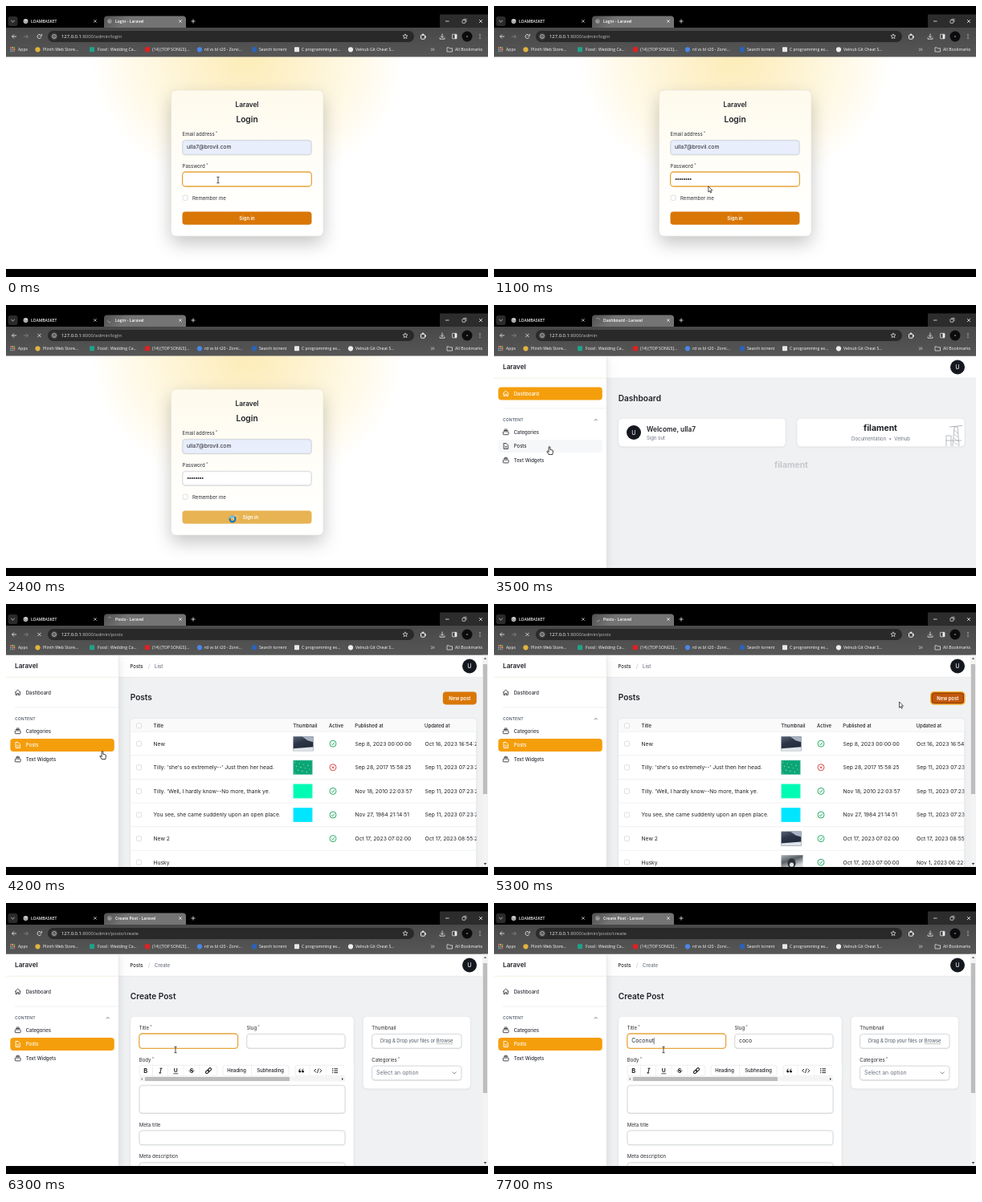
An HTML page with a canvas that plays this animation: 600x338 px, repeating every 8000 ms.

```html
<!DOCTYPE html>
<html lang="en">
<head>
<meta charset="utf-8">
<title>Admin panel walkthrough</title>
<style>
html, body { margin: 0; width: 100%; height: 100%; overflow: hidden; background: #000; }
canvas { display: block; width: 600px; height: 338px; }
</style>
</head>
<body>
<canvas id="stage"></canvas>
<script>
const W = 600, H = 338, LOOP = 8000, STEP = 100;
const UI = 'Inter, sans-serif', CHROME = '"Open Sans", sans-serif';
const AMBER = '#f59e0b', ORANGE = '#d97706', INK = '#1f2126', GREY = '#6b7280', LINE = '#dfe1e5';
const USER = 'ulla7';

const canvas = document.getElementById('stage');
const ratio = window.devicePixelRatio || 1;
canvas.width = W * ratio;
canvas.height = H * ratio;
const c = canvas.getContext('2d');

// ---- drawing helpers ----
function text(s, x, y, size, { w = 400, col = INK, font = UI, align = 'left' } = {}) {
  c.font = `${w} ${size}px ${font}`;
  c.fillStyle = col;
  c.textAlign = align;
  c.fillText(s, x, y + size * 0.36);
  return c.measureText(s).width;
}
function box(x, y, w, h, r, fill, stroke, lw = 0.7) {
  c.beginPath();
  c.roundRect(x, y, w, h, r);
  if (fill) { c.fillStyle = fill; c.fill(); }
  if (stroke) { c.strokeStyle = stroke; c.lineWidth = lw; c.stroke(); }
}
function disc(x, y, r, fill) {
  c.beginPath();
  c.arc(x, y, r, 0, 7);
  c.fillStyle = fill;
  c.fill();
}
function arc(x, y, r, a, b, col, lw = 0.8) {
  c.beginPath();
  c.arc(x, y, r, a, b);
  c.strokeStyle = col;
  c.lineWidth = lw;
  c.stroke();
}
function path(pts, col, lw = 0.8, fill) {
  c.beginPath();
  for (let i = 0; i < pts.length; i += 2) c.lineTo(pts[i], pts[i + 1]);
  if (fill) { c.closePath(); c.fillStyle = fill; c.fill(); }
  if (col) { c.strokeStyle = col; c.lineWidth = lw; c.stroke(); }
}
function cross(x, y, r, col, lw = 0.8) {
  path([x - r, y - r, x + r, y + r], col, lw);
  path([x + r, y - r, x - r, y + r], col, lw);
}
function shadowed(blur, dy, col, draw) {
  c.save();
  c.shadowBlur = blur * ratio;
  c.shadowOffsetY = dy * ratio;
  c.shadowColor = col;
  draw();
  c.restore();
}
function card(x, y, w, h) {
  shadowed(2, 0.8, '#0001', () => box(x, y, w, h, 5, '#fff'));
  box(x, y, w, h, 5, null, LINE, 0.6);
}
function label(s, x, y, required) {
  const w = text(s, x, y, 6.1, { col: '#2b2d33' });
  if (required) text('*', x + w + 1.2, y - 1.6, 5, { col: '#7a5a5a' });
}
function input(x, y, w, h, focus, fill = '#fff') {
  if (focus) box(x + 0.1, y, w - 0.2, h, 3.8, fill, '#e6a53c', 1.3);
  else shadowed(1, 0.5, '#0002', () => box(x + 0.3, y + 0.3, w - 0.6, h - 0.6, 3.5, fill, '#d5d8dd'));
}
function checkbox(x, y) {
  box(x + 0.3, y + 0.3, 6, 6, 1.3, '#fff', '#cfd2d7', 0.7);
}
function avatar(x, y) {
  disc(x, y, 9, '#15181f');
  text('U', x, y, 7.2, { col: '#fff', align: 'center' });
}

// ---- timing ----
const within = (t, a, b) => t >= a && t < b;
const last = (t, list) => list.filter(e => e[0] <= t).pop();
const busy = t => within(t, 2100, 2500) || within(t, 3400, 4600) || within(t, 5100, 5800);

const PAGES = [
  [0, 'Login', '/login', drawLogin],
  [2500, 'Dashboard', '', drawDashboard],
  [3900, 'Posts', '/posts', drawPosts],
  [5700, 'Create Post', '/posts/create', drawCreate]
];

const MOVES = [
  [0, 264, 217], [1000, 264, 217], [1400, 282, 267], [2700, 282, 267], [3300, 69, 176.5],
  [3700, 69, 176.5], [4100, 120, 183.5], [4500, 120, 183.5], [4900, 563, 117], [5100, 563, 117],
  [5300, 504.5, 122], [5600, 504.5, 122], [6100, 211, 183]
];
const SHAPES = [
  [0, 'beam'], [100, ''], [1000, 'arrow'], [1300, 'hand'], [1500, 'wait'], [2500, 'arrow'],
  [3200, 'hand'], [4500, 'arrow'], [4900, 'hand'], [5200, 'arrow'], [6100, 'beam']
];
const DOTS = [[0, 0], [100, 1], [400, 3], [500, 4], [700, 5], [800, 7], [900, 8]];
const TYPED = [
  [0, '', ''], [6500, 'C', ''], [7000, 'Co', ''], [7100, 'Co', 'c'], [7300, 'Coc', 'c'],
  [7400, 'Coc', 'co'], [7600, 'Coco', 'co'], [7700, 'Coconut', 'coco']
];

function pointer(t) {
  const i = MOVES.findLastIndex(m => m[0] <= t);
  const a = MOVES[i], b = MOVES[i + 1] || a;
  const k = a === b ? 0 : (t - a[0]) / (b[0] - a[0]);
  const e = k * k * (3 - 2 * k);
  return [a[1] + (b[1] - a[1]) * e, a[2] + (b[2] - a[2]) * e];
}

// ---- browser frame ----
function favicon(x, y, t, loading) {
  if (loading) arc(x, y, 2.6, t / 120, t / 120 + 2, '#aaa', 0.8);
  else {
    disc(x, y, 2.9, '#888');
    arc(x, y, 1.5, 0, 4, '#bbb', 0.6);
  }
}
function drawBrowser(t, title, route) {
  const white = '#f0f0f0', loading = busy(t);
  c.fillStyle = '#000';
  c.fillRect(0, 0, W, H);
  c.fillStyle = '#2c2c2c';
  c.fillRect(540, 10.5, 60, 17);
  box(2.5, 13, 12, 12, 3, '#2b2b2b');
  path([6.4, 18, 8.5, 20, 10.6, 18], white);

  disc(24.5, 19, 2.9, '#ccc');
  arc(24.5, 19, 1.5, 0, 4, '#555', 0.6);
  text('LOAMBASKET', 31, 19, 5, { w: 600, col: '#eee', font: CHROME });
  cross(111, 19, 1.7, '#ccc');
  const tab = c.createLinearGradient(122, 12, 140, 28);
  tab.addColorStop(0, '#505050');
  tab.addColorStop(1, '#747474');
  box(122, 12.5, 102, 18, 4, tab);
  favicon(129, 19, t, loading);
  text(title + ' - Laravel', 136, 19, 5.1, { w: 600, col: '#fff', font: CHROME });
  cross(217, 19, 1.7, white);
  path([230.5, 19, 235.5, 19], white);
  path([233, 16.5, 233, 21.5], white);
  path([547, 19, 551.5, 19], white);
  box(568, 17.5, 3.8, 3.8, 0.5, null, white);
  path([569.3, 16.3, 573, 16.3, 573, 20], white, 0.6);
  cross(591, 19, 2, white);

  const bar = c.createLinearGradient(0, 27, 0, 63);
  bar.addColorStop(0, '#484848');
  bar.addColorStop(1, '#565656');
  c.fillStyle = bar;
  c.fillRect(0, 27, W, 36.5);

  path([13, 38, 7.5, 38], white);
  path([10, 35.5, 7.5, 38, 10, 40.5], white);
  path([22, 38, 27.5, 38], '#8a8a8a');
  path([25, 35.5, 27.5, 38, 25, 40.5], '#8a8a8a');
  if (loading) cross(41.5, 38, 2.1, white);
  else {
    arc(41.5, 38, 2.5, 0.4, 5.4, white);
    path([44.4, 34.8, 44.4, 37.3, 41.9, 37.3], white);
  }
  box(52, 31, 456, 14, 7, '#292929');
  disc(60, 38, 4.6, '#3e3e3e');
  arc(60, 38, 2.4, 0, 7, white, 0.7);
  path([60, 37.6, 60, 39.3], white, 0.7);
  const host = text('127.0.0.1', 69, 38, 5.9, { w: 500, col: '#fff', font: CHROME });
  text(':8000/admin' + route, 69 + host, 38, 5.9, { col: '#bdbdbd', font: CHROME });

  const star = [];
  for (let i = 0; i < 11; i++) {
    const r = i % 2 ? 1.4 : 3.2, a = i * Math.PI / 5 - Math.PI / 2;
    star.push(497 + r * Math.cos(a), 38 + r * Math.sin(a));
  }
  path(star, white, 0.7);
  box(516.5, 36.2, 5, 5, 0.8, null, white, 1);
  disc(519, 35.7, 1.1, white);
  disc(522, 38.5, 1.1, white);
  path([543, 34.5, 543, 39.3], white);
  path([541, 37.5, 543, 39.5, 545, 37.5], white);
  path([540, 39.5, 540, 41.2, 546, 41.2, 546, 39.5], white);
  box(555.5, 35.3, 5.5, 5.5, 0.6, null, white);
  c.fillStyle = white;
  c.fillRect(558.6, 35.3, 2.4, 5.5);
  disc(574, 38, 6.5, '#0c0c0e');
  disc(574, 38, 1, '#777');
  for (const y of [35.7, 38, 40.3]) disc(590, y, 0.6, white);

  const mark = (s, x) => text(s, x, 54.5, 5.15, { w: 500, col: '#fafafa', font: CHROME });
  const hues = ['#e8675a', '#f0c04a', '#61b36b', '#6a9df0'];
  for (let i = 0; i < 9; i++) {
    c.fillStyle = hues[i % 4];
    c.fillRect(5 + i % 3 * 2.3, 51 + Math.floor(i / 3) * 2.3, 1.6, 1.6);
  }
  mark('Apps', 15);
  const square = (x, col) => box(x - 3, 51.3, 6, 6, 0.8, col);
  disc(39.5, 54.3, 3.1, '#e2b43c'); mark('Plinth Web Store...', 46);
  square(107, '#1fa38a'); mark('Food : Wedding Ca...', 114);
  square(176, '#e02020'); mark('(14) [TOP SONGS]...', 182);
  disc(241, 54.3, 3.1, '#4a86e8'); mark('rd vs bl t20 - Zorvi...', 247);
  square(309, '#2c62b4'); mark('Search torrent', 315);
  square(362, '#e8e8e8'); mark('C programming ex...', 368);
  disc(429, 54.3, 3.1, '#eee'); mark('Velnub Git Cheat S...', 435);
  path([529, 52.5, 530.8, 54.3, 529, 56.1], white, 0.7);
  path([531.3, 52.5, 533.1, 54.3, 531.3, 56.1], white, 0.7);
  path([549, 57, 549, 51.8, 551.3, 51.8, 552.2, 52.8, 555.5, 52.8, 555.5, 57, 549, 57], white, 0.7);
  mark('All Bookmarks', 559);
}

// ---- login page ----
function drawLogin(t) {
  c.fillStyle = '#fff';
  c.fillRect(0, 63.5, W, 265);
  c.save();
  c.translate(300, 64);
  c.scale(1, 0.85);
  const glow = c.createRadialGradient(0, 0, 10, 0, 0, 195);
  glow.addColorStop(0, '#fdedbb');
  glow.addColorStop(0.4, '#fef4d4');
  glow.addColorStop(0.75, '#fffaeb');
  glow.addColorStop(1, '#fff');
  c.fillStyle = glow;
  c.fillRect(-300, -6, 600, 300);
  c.restore();

  const face = c.createLinearGradient(0, 105, 0, 287);
  face.addColorStop(0, '#fefaec');
  face.addColorStop(0.6, '#fffefa');
  face.addColorStop(1, '#fff');
  shadowed(22, 9, '#0000003a', () => box(205.5, 105, 189.5, 182, 6, face));
  box(205.5, 105, 189.5, 182, 6, null, '#e6e3da', 0.6);

  text('Laravel', 300, 123.5, 8.3, { w: 600, align: 'center' });
  text('Login', 300, 141.7, 10.2, { w: 600, align: 'center' });
  label('Email address', 219.5, 159.5, true);
  input(219.5, 167, 161, 18.5, false, '#e8eefc');
  text(USER + '@brovil.com', 225, 176, 6.85);
  label('Password', 219.5, 199.5, true);
  const sent = t >= 1400;
  input(219.5, 207, 161, 18, !sent);
  const n = last(t, DOTS)[1];
  for (let i = 0; i < n; i++) disc(226.6 + i * 2.58, 216, 1, INK);
  checkbox(219.8, 236);
  label('Remember me', 232, 239.5);

  box(219.5, 256.6, 161, 16.2, 3.8, sent ? '#e8b352' : ORANGE);
  if (sent) {
    arc(286, 265, 3, 0, 7, '#f0ca86', 1);
    arc(286, 265, 3, t / 160, t / 160 + 1.6, '#fff', 1);
  }
  text('Sign in', sent ? 304.5 : 300, 265, 5.9, { w: 600, col: '#fff', align: 'center' });
}

// ---- panel shell ----
const ICONS = {
  home(x, y, col) {
    path([x - 3.6, y, x, y - 3.4, x + 3.6, y], col, 0.9);
    path([x - 2.6, y - 0.8, x - 2.6, y + 3, x - 0.8, y + 3, x - 0.8, y + 0.9, x + 0.8, y + 0.9, x + 0.8, y + 3, x + 2.6, y + 3, x + 2.6, y - 0.8], col, 0.9);
  },
  stack(x, y, col) {
    box(x - 3.4, y - 0.6, 6.8, 3.8, 0.8, null, col, 0.9);
    path([x - 2.7, y - 2, x + 2.7, y - 2], col, 0.9);
    path([x - 1.9, y - 3.4, x + 1.9, y - 3.4], col, 0.9);
  },
  page(x, y, col) {
    path([x - 2.6, y - 3.5, x + 0.5, y - 3.5, x + 2.7, y - 1.2, x + 2.7, y + 3.5, x - 2.6, y + 3.5, x - 2.6, y - 3.9], col, 0.9);
    path([x - 1.2, y + 0.3, x + 1.3, y + 0.3], col, 0.7);
    path([x - 1.2, y + 1.8, x + 1.3, y + 1.8], col, 0.7);
  }
};
function navItem(name, y, icon, active, hover) {
  if (active || hover) box(5.3, y - 8, 129.5, 16, 4, active ? AMBER : '#f6f7f8');
  ICONS[icon](14.7, y, active ? '#fff' : '#33363d');
  text(name, 24.7, y, 6, { w: 500, col: active ? '#fff' : '#2d3038' });
}
function drawShell(active, heading, crumb, t) {
  c.fillStyle = '#eff1f3';
  c.fillRect(0, 63.5, W, 265);
  c.fillStyle = '#fff';
  c.fillRect(140, 63.5, 460, 27.5);
  path([140, 91.2, 600, 91.2], '#e3e5e8', 0.6);
  shadowed(10, 2, '#0002', () => { c.fillStyle = '#fff'; c.fillRect(0, 63.5, 140, 265); });
  path([140.3, 63.5, 140.3, 328], '#e3e5e8', 0.6);
  path([0, 91.2, 140, 91.2], '#eee5d2', 0.6);
  text('Laravel', 11, 77.5, 8.2, { w: 600 });

  navItem('Dashboard', 110.5, 'home', active === 0);
  path([11, 129, 140, 129], '#e8e9eb', 0.6);
  text('CONTENT', 11, 143.3, 5.2, { w: 500, col: '#4b5563' });
  if (!within(t, 3900, 4500)) path([125, 144.2, 126.8, 142.4, 128.6, 144.2], '#555', 0.8);
  navItem('Categories', 158.5, 'stack');
  navItem('Posts', 176, 'page', active === 1, within(t, 3200, 3900));
  navItem('Text Widgets', 193.7, 'stack');

  if (crumb) {
    text('Posts', 154.5, 77.7, 6, { w: 500 });
    path([177.2, 81, 179, 74.3], '#c4c7cc', 0.7);
    text(crumb, 185, 77.7, 6, { w: 500, col: GREY });
  }
  text(heading, 154.7, 116.5, 10.1, { w: 600 });
  avatar(577, 77.5);
}
function scrollbar() {
  c.fillStyle = '#f3f3f3';
  c.fillRect(593, 63.5, 7, 265);
  box(593.8, 75, 5.2, 162, 0.5, '#bdbdbd');
  path([594.6, 69, 598.4, 69, 596.5, 66.5], null, 0, '#777');
  path([594.6, 323, 598.4, 323, 596.5, 325.5], null, 0, '#444');
}

// ---- dashboard ----
function drawDashboard(t) {
  drawShell(0, 'Dashboard', '', t);
  card(154.7, 141.3, 208.5, 35.5);
  avatar(174, 159);
  text('Welcome, ' + USER, 190, 154.7, 8.3, { w: 600 });
  text('Sign out', 190, 165.5, 5.9, { col: GREY });
  card(377, 141.3, 209, 35.5);
  text('filament', 481, 153.5, 10.4, { w: 700, align: 'center' });
  text('Documentation  •  Velnub', 481.5, 166.5, 6, { col: GREY, align: 'center' });
  text('filament', 370, 199, 10.4, { w: 700, col: '#c5c8cc', align: 'center' });
  // small sketch of towers
  const g = '#9da1a7';
  path([571, 176, 573, 152, 577, 152, 579, 176], g, 0.7);
  for (let y = 156; y < 176; y += 5) path([572.4, y, 577.8, y + 4], g, 0.6);
  path([567, 152, 583, 150.5], g, 0.8);
  path([563, 176, 563, 163, 569, 163, 569, 176], g, 0.7);
  path([562, 169, 582, 169], g, 0.7);
}

// ---- post list ----
const ROWS = [
  ['New', 'photo', 'Sep 8, 2023 00:00:00', 'Oct 16, 2023 16:54:28'],
  ["Tilly: 'she's so extremely--' Just then her head.", '#0aa678', 'Sep 28, 2017 15:58:25', 'Sep 11, 2023 07:23:22'],
  ["Tilly. 'Well, I hardly know--No more, thank ye.", '#00fbb4', 'Nov 18, 2010 22:03:57', 'Sep 11, 2023 07:23:22'],
  ['You see, she came suddenly upon an open place.', '#00e6ff', 'Nov 27, 1984 21:14:51', 'Sep 11, 2023 07:23:22'],
  ['New 2', 'photo', 'Oct 17, 2023 07:02:00', 'Oct 17, 2023 08:55:21'],
  ['Husky', 'dog', 'Oct 17, 2023 07:00:00', 'Nov 1, 2023 06:22:40']
];
function thumb(kind, y) {
  const x = 357.5, top = y - 9;
  if (kind[0] === '#') {
    c.fillStyle = kind;
    c.fillRect(x, top, 24, 18);
    c.setLineDash([1, 1.2]);
    c.strokeStyle = '#ffffffb0';
    c.lineWidth = 0.6;
    c.strokeRect(x + 0.3, top + 0.3, 23.4, 17.4);
    c.setLineDash([]);
    if (kind === '#0aa678') for (let i = 0; i < 18; i++) disc(x + 2 + i * 7.3 % 20, top + 3 + i * 5.9 % 13, 0.5, '#d9e28a');
    return;
  }
  const dog = kind === 'dog', g = c.createLinearGradient(x, top, x + 6, top + 18);
  g.addColorStop(0, dog ? '#a9b0b4' : '#596475');
  g.addColorStop(0.5, dog ? '#596066' : '#2c3648');
  g.addColorStop(1, dog ? '#d5d8da' : '#232c3c');
  c.fillStyle = g;
  c.fillRect(x, top, dog ? 27 : 25, 18);
  if (dog) {
    c.beginPath();
    c.ellipse(x + 13, top + 10, 5, 6, 0, 0, 7);
    c.fillStyle = '#2d3238';
    c.fill();
    disc(x + 13, top + 12, 2.6, '#e3e5e6');
  } else {
    path([x + 11, top, x + 25, top, x + 25, top + 7, x + 18, top + 5], null, 0, '#a8b3c2');
    path([x, top + 18, x, top + 15, x + 25, top + 13, x + 25, top + 18], null, 0, '#dfe4ea');
  }
}
function status(y, ok) {
  const col = ok ? '#16a35a' : '#d43a3a';
  arc(407, y, 4, 0, 7, col, 0.9);
  if (ok) path([405.2, y + 0.2, 406.5, y + 1.5, 408.9, y - 1.5], col, 0.9);
  else cross(407, y, 1.5, col, 0.9);
}
function drawPosts(t) {
  const loaded = t >= 4600, updated = loaded ? 526 : 521.5;
  drawShell(1, 'Posts', 'List', t);
  if (t >= 5000) {
    box(543.8, 109.8, 42, 15.2, 4, '#c2570c', '#f3ad2c', 1.6);
    box(545.2, 111.2, 39.2, 12.4, 3, null, '#7a2d08', 0.8);
  } else box(543.8, 109.6, 42, 15.8, 3.8, ORANGE);
  text('New post', 564.8, 117.5, 5.9, { w: 600, col: '#fff', align: 'center' });

  card(154.7, 143, 431, 200);
  c.save();
  c.beginPath();
  c.roundRect(155, 143.3, 430.5, 200, 5);
  c.clip();
  c.fillStyle = '#fafafa';
  c.fillRect(155, 143, 431, 16.2);
  const heads = [['Title', 183.5], ['Thumbnail', 357.3], ['Active', 402], ['Published at', 434.3], ['Updated at', updated - 0.5]];
  for (const [s, x] of heads) text(s, x, 151.7, 6, { w: 500 });
  checkbox(162.2, 148.4);
  ROWS.forEach(([title, kind, made, changed], i) => {
    const y = 174.2 + i * 29.6, late = i > 3 && !loaded;
    path([155, y - 14.9, 586, y - 14.9], '#e5e7ea', 0.6);
    checkbox(162.2, y - 3.3);
    text(title, 183.5, y, 6.75);
    if (!late) thumb(kind, y);
    if (i === 5 && !loaded) return;
    status(y, i !== 1);
    text(made, 434.5, y, 6.75);
    text(changed, updated, y, 6.75);
  });
  c.restore();
  scrollbar();
}

// ---- create form ----
function drawToolbar() {
  for (const [x, w] of [[166, 97], [270, 82], [360, 66]]) box(x, 202.3, w, 13.5, 3, '#fff', LINE, 0.6);
  for (const x of [182.5, 201.5, 221, 241, 305.5, 378, 399]) path([x, 202.3, x, 215.8], LINE, 0.5);
  const mid = { w: 700, align: 'center' }, y = 209.2;
  text('B', 173.7, y, 7.5, mid);
  path([191.5, 206.2, 194.5, 206.2], INK, 1);
  path([193.2, 206.2, 191.8, 212], INK, 1);
  path([190.3, 212, 193.3, 212], INK, 1);
  text('U', 211.3, y - 0.5, 6.8, mid);
  path([208.3, 212.8, 214.3, 212.8], INK, 0.8);
  text('S', 231, y, 7, mid);
  path([227.5, y, 234.5, y], INK, 0.8);
  c.save();
  c.translate(252, y);
  c.rotate(-0.75);
  box(-4.3, -1.5, 4.8, 3, 1.5, null, INK, 1.1);
  box(-0.5, -1.5, 4.8, 3, 1.5, null, INK, 1.1);
  c.restore();
  text('Heading', 287, y, 5.9, { w: 500, align: 'center' });
  text('Subheading', 329, y, 5.9, { w: 500, align: 'center' });
  for (const x of [365.8, 369.6]) {
    disc(x, 210.2, 1.4, INK);
    path([x - 1, 210, x - 0.8, 207.8, x + 0.9, 206.9], INK, 0.8);
  }
  path([386, 207, 383.8, 209.2, 386, 211.4], INK, 1);
  path([390.6, 207, 392.8, 209.2, 390.6, 211.4], INK, 1);
  path([389.1, 206.4, 387.5, 212], INK, 0.9);
  for (const dy of [-2.4, 0, 2.4]) {
    disc(406.6, y + dy, 0.7, INK);
    path([408.4, y + dy, 413, y + dy], INK, 1);
  }
  c.fillStyle = '#fff';
  c.fillRect(421.5, 201, 11, 16);
  c.fillStyle = '#f4f4f4';
  c.fillRect(166, 216.2, 256, 6.3);
  c.fillStyle = '#bcbcbc';
  c.fillRect(173, 217, 180, 5);
  path([170, 218, 170, 221, 168, 219.5], null, 0, '#888');
  path([418, 218, 418, 221, 420, 219.5], null, 0, '#333');
}
function drawCreate(t) {
  const [, title, slug] = last(t, TYPED);
  drawShell(1, 'Create Post', 'Create', t);
  card(154.7, 141.3, 278.5, 205);
  label('Title', 165.7, 156, true);
  input(165.7, 163, 123, 18.3, t >= 6100);
  const w = text(title, 171.2, 172, 6.9);
  if (title) path([171.6 + w, 168, 171.6 + w, 176.3], INK, 0.6);
  label('Slug', 299.4, 156, true);
  input(299.4, 163, 123, 18.3);
  text(slug, 305, 172, 6.9);
  label('Body', 165.7, 195.7, true);
  drawToolbar();
  input(165.7, 227, 256.7, 35.3);
  label('Meta title', 165.7, 276.5);
  input(165.7, 283.3, 256.7, 18.5);
  label('Meta description', 165.7, 316.2);
  input(165.7, 323.3, 256.7, 30);

  card(444.3, 141.3, 134, 90.5);
  label('Thumbnail', 455.3, 156);
  input(455.3, 163, 112, 18.3);
  const hint = text('Drag & Drop your files or ', 466, 172, 5.85, { col: '#4b5563' });
  const link = text('Browse', 466 + hint, 172, 5.85, { col: '#4b5563' });
  path([466 + hint, 175.6, 466 + hint + link, 175.6], '#888', 0.5);
  label('Categories', 455.3, 195.7, true);
  input(455.3, 202.7, 112, 18.3);
  text('Select an option', 461, 211.7, 6.9, { col: GREY });
  path([555.8, 210.6, 558.2, 213, 560.6, 210.6], GREY, 0.9);
  scrollbar();
}

// ---- pointer ----
function drawPointer(t) {
  const kind = last(t, SHAPES)[1], [x, y] = pointer(t);
  if (kind === 'beam') {
    path([x, y - 3.5, x, y + 3.5], '#222', 0.8);
    for (const d of [-3.7, 3.7]) path([x - 1.6, y + d, x + 1.6, y + d], '#222', 0.8);
  } else if (kind === 'arrow') {
    path([x, y, x, y + 7.3, x + 1.7, y + 5.8, x + 2.8, y + 8.2, x + 3.9, y + 7.7, x + 2.8, y + 5.3, x + 5, y + 5.2, x, y], '#111', 0.7, '#fff');
  } else if (kind === 'hand') {
    path([x - 0.9, y + 0.6, x, y, x + 0.9, y + 0.6, x + 0.9, y + 3.8, x + 3.8, y + 4.5, x + 4.5, y + 5.5, x + 3.9, y + 10,
      x - 0.8, y + 10, x - 3.2, y + 6.2, x - 2.4, y + 5.5, x - 0.9, y + 7, x - 0.9, y + 0.6], '#111', 0.8, '#fff');
  } else if (kind === 'wait') {
    arc(x, y, 3.4, 0, 7, '#1677b8', 2.2);
    arc(x, y, 3.4, t / 150, t / 150 + 2, '#7fd0f5', 1.8);
  }
}

function frame(now) {
  const t = Math.floor(now % LOOP / STEP) * STEP;
  const [, title, route, draw] = last(t, PAGES);
  c.setTransform(ratio, 0, 0, ratio, 0, 0);
  drawBrowser(t, title, route);
  c.save();
  c.beginPath();
  c.rect(0, 63.5, W, 264.5);
  c.clip();
  draw(t);
  drawPointer(t);
  c.restore();
  requestAnimationFrame(frame);
}
requestAnimationFrame(frame);
</script>
</body>
</html>
```
